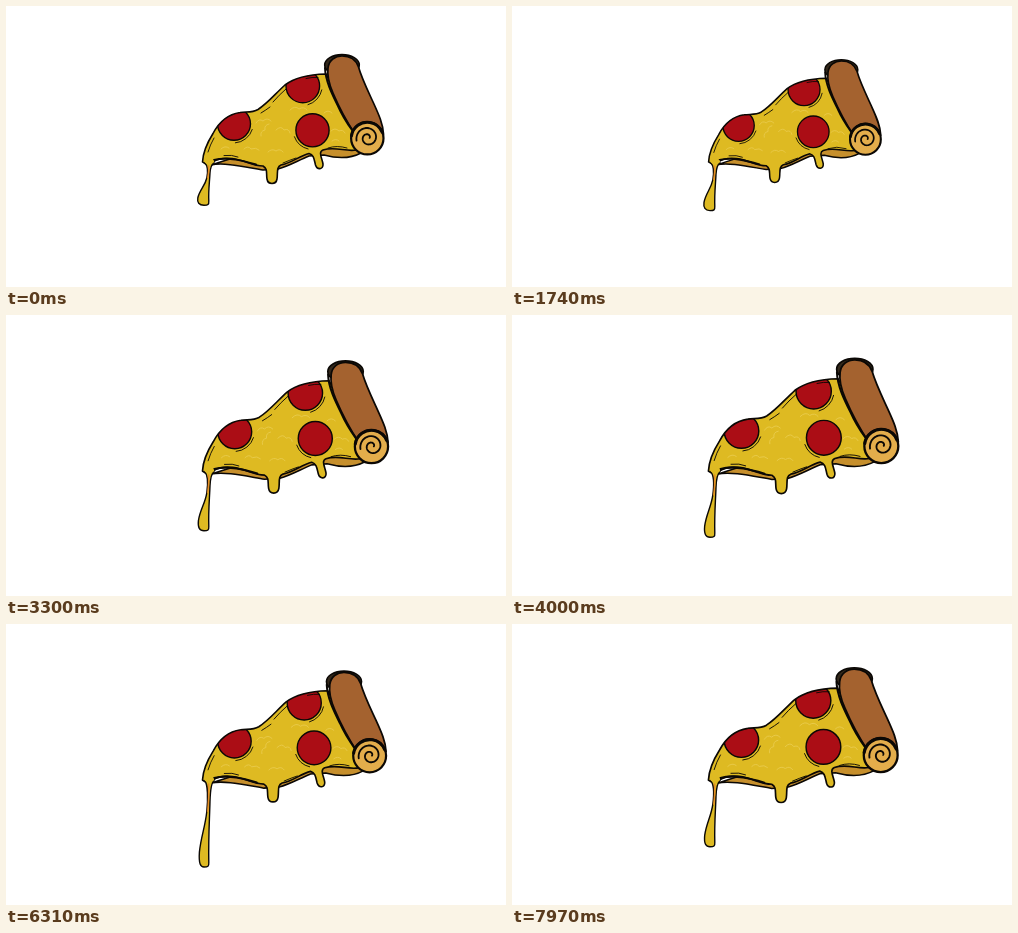
Recreate the animation shown at these times as an HTML page with a canvas. Size 500 by 281 pixels, loop 8 s.

```html
<!DOCTYPE html>
<html lang="en">
<head>
<meta charset="utf-8">
<title>Pizza slice</title>
<style>
html, body { margin: 0; width: 100%; height: 100%; overflow: hidden; background: #fff; }
canvas { display: block; width: 500px; height: 281px; }
</style>
</head>
<body>
<canvas id="stage" width="500" height="281"></canvas>
<script>
const ctx = document.getElementById('stage').getContext('2d');
const LOOP = 8000;
const PIVOT = { x: 198, y: 155 };
const INK = '#0b0805', CHEESE = '#deba22', SHINE = '#e9cb4c', UNDER = '#c68f2c',
      CRUST = '#a4622f', SHADE = '#33281b', ROLL = '#e3ad4b', MEAT = '#ab0d15';

// [time, right edge of the slice]
const REACH = [[700, 378.3], [1100, 373], [1500, 369.5], [1740, 369.6], [2300, 373],
  [2640, 376.3], [3140, 381.3], [3600, 385.6], [3960, 387.2], [4360, 385.6],
  [4770, 382.8], [5500, 380.3], [6310, 380.9], [7310, 383.8], [8000, 386.6]];
// [time, bottom of the long drip]
const DRIP = [[700, 200], [1500, 204], [1740, 205.3], [2300, 208.8], [2640, 210.8],
  [3140, 215], [4000, 223], [4770, 231.3], [5640, 239.3], [6350, 243.8],
  [6510, 242.8], [7340, 234], [8000, 223]];

// Smooth curve through the keys, held at both ends
function sample(keys, t) {
  const last = keys.length - 1;
  if (t <= keys[0][0]) return keys[0][1];
  if (t >= keys[last][0]) return keys[last][1];
  const i = keys.findIndex(k => k[0] > t) - 1;
  const slope = j => {
    const a = keys[Math.max(j - 1, 0)], b = keys[Math.min(j + 1, last)];
    return (b[1] - a[1]) / (b[0] - a[0]);
  };
  const [t0, v0] = keys[i], [t1, v1] = keys[i + 1];
  const h = t1 - t0, u = (t - t0) / h, w = 1 - u;
  return w * w * (1 + 2 * u) * v0 + u * u * (3 - 2 * u) * v1
       + h * u * w * (w * slope(i) - u * slope(i + 1));
}

const cheese = new Path2D(`M196.500 156 C197 147 201 137 207 127.500 C212 118 220 108.500 234 106.500
  C240 105.500 246 107 252 103.500 C262 97 269 88 279 79 C288 72 303 68.5 320 68
  L350 124 L350 144 C340 146 329 140 317 144 C312 146 316 152 317 158
  C317.500 164 311 164 309.500 159 C308 153 308 149 303 147.500 C293 150 286 157 275 159
  C270 161 272 167 271 173 C270 179 262 179 261 173 C260 167 262 163 257 160
  C246 160 239 154 226 152.500 C217 151.500 211 153 207 156 C204 158 200 159 196.500 156 Z`);
const underside = new Path2D(`M205 159 C218 156 239 161 257 164 L272 163
  C283 160 291 155 303 150 L318 149 C329 152 342 154 355 147 L349 139 L300 144
  L270 156 L230 151 Z`);
const lip = new Path2D(`M208 154 C222 150.500 238 155 250 158.500`);
const ticks = new Path2D(`M208 132 Q204 139 202 146 M267 96 Q273 89 280 83
  M218 149.500 Q226 148.500 232 151 M255 107 Q260 104 264 101
  M277 157 Q284 154 290 152 M322 142 Q331 139 341 142 M300 72.500 Q306 71 312 71.500`);
const shine = new Path2D(`M250 117 q3 -5 7 -2 q4 -4 8 0 M255 130 q-1 -5 4 -6 q-1 -5 4 -6
  M270 124 q5 -5 8 0 q5 -2 6 3 M238 143 q4 -4 7 0 q5 -2 8 1 M215 143 q4 -4 8 -1
  M284 104 q5 -5 9 -1 q5 -3 8 1 M318 107 q4 -4 8 0 M325 125 q4 -4 8 0 q4 -2 6 2
  M262 146 q4 -4 8 -1 q4 -3 7 1 M326 135 q4 -3 7 0`);
const crust = new Path2D(`M322 62 C323 54 329 50 336 50 C344 50 350 54 352.500 61
  C356 73 362 85 367.500 97 C373 109 377 118 377.500 128 L349 128
  C341 116 333 101 327 87 C323 78 321 70 322 62 Z`);
const crustEdge = new Path2D(`M319 62 C319.500 75 326 88 332 100 C336 109 341 117 346 124`);

function fill(path, color) { ctx.fillStyle = color; ctx.fill(path); }
function ink(path, width, color = INK) {
  ctx.strokeStyle = color;
  ctx.lineWidth = width;
  ctx.stroke(path);
}
function oval(x, y, rx, ry = rx, from = 0, to = Math.PI * 2, turn = 0) {
  const p = new Path2D();
  p.ellipse(x, y, rx, ry, turn, from, to);
  return p;
}
function spiral(x, y, r0, r1, start, turns) {
  const p = new Path2D(), steps = 60;
  for (let i = 0; i <= steps; i++) {
    const k = i / steps, a = start + k * turns * Math.PI * 2, r = r0 + (r1 - r0) * k;
    p.lineTo(x + r * Math.cos(a), y + r * Math.sin(a));
  }
  return p;
}

function pepperoni(x, y, r, from, to) {
  const disc = oval(x, y, r);
  fill(disc, MEAT);
  ink(disc, 1.4);
  ink(oval(x, y, r + 2.6, r + 2.6, from, to), 0.9);
}

function drawSlice() {
  fill(underside, UNDER);
  ink(underside, 1.5);
  fill(cheese, CHEESE);
  ink(shine, 0.9, SHINE);
  ctx.save();
  ctx.clip(cheese);
  pepperoni(228, 117.8, 16.5, 0.3, 1.5);
  pepperoni(296.8, 80, 16.8, 0.2, 1.3);
  ctx.restore();
  pepperoni(306.5, 124.3, 16.6, 1.8, 2.8);
  ink(cheese, 1.6);
  ink(lip, 2);
  ink(ticks, 0.9);

  const cap = oval(336, 59, 17.3, 10.4);
  fill(cap, SHADE);
  ink(cap, 1.6);
  fill(crust, CRUST);
  ink(crust, 1.7);
  ink(crustEdge, 2);
  const roll = oval(361.3, 132.2, 16.2, 16.2);
  fill(roll, ROLL);
  ink(roll, 2.2);
  ink(oval(361.3, 132.2, 16, 16, 3.3, 5.9), 3);
  ink(spiral(361.8, 131.8, 11.6, 1.8, 2.9, 1.55), 1.8);
}

function drawDrip(bottom) {
  const top = 157, end = bottom - 0.7, k = (end - top) / 42.3;
  const pinch = Math.min(1.6, Math.max(0, (k - 1) * 1.6));
  const y = v => top + (v - top) * k;
  const p = new Path2D();
  p.moveTo(198.5, 156.5);
  p.bezierCurveTo(202, 160, 202, y(166), 200.8, y(172));
  p.bezierCurveTo(199, y(180), 193.5 + pinch, y(184), 191.8 + pinch, y(192));
  p.bezierCurveTo(191 + pinch, end - 3, 193 + pinch, end, 198, end);
  p.bezierCurveTo(202, end, 203, end - 0.5, 202.8, end - 4.3);
  p.bezierCurveTo(202.3, y(184), 203.5, y(177), 204, y(167));
  p.bezierCurveTo(204.3, y(162), 205, 159, 208, 156.5);
  fill(p, CHEESE);
  ink(p, 1.4);
  const neck = new Path2D();
  neck.moveTo(202.6, 160);
  neck.quadraticCurveTo(203, y(165), 201.8, y(172));
  ink(neck, 1.4, '#e58b25');
  // Hide the seam where the drip leaves the slice
  ink(new Path2D('M200 155.500 Q203 158 206.500 155.500'), 3.2, CHEESE);
}

function draw(t) {
  const s = (sample(REACH, t) - PIVOT.x) / 180.3;
  ctx.setTransform(1, 0, 0, 1, 0, 0);
  ctx.fillStyle = '#fff';
  ctx.fillRect(0, 0, 500, 281);
  ctx.lineCap = ctx.lineJoin = 'round';
  ctx.save();
  ctx.translate(PIVOT.x, PIVOT.y);
  ctx.scale(s, s);
  ctx.translate(-PIVOT.x, -PIVOT.y);
  drawSlice();
  ctx.restore();
  drawDrip(sample(DRIP, t));
}

const start = performance.now();
function tick() {
  draw((performance.now() - start) % LOOP);
  requestAnimationFrame(tick);
}
tick();
</script>
</body>
</html>
```
